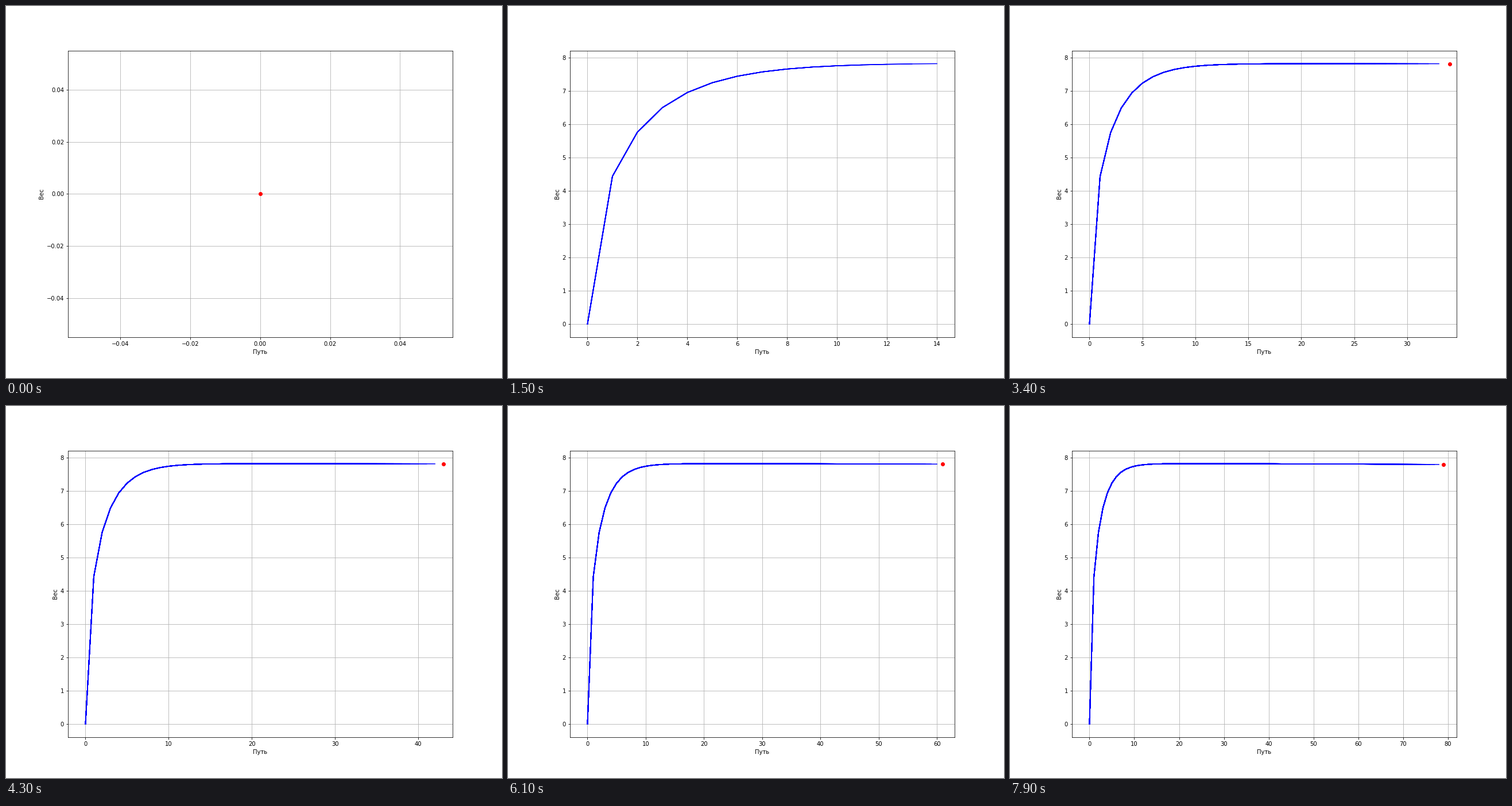
Animation, 864 px wide and 648 px high, one loop 8 s. Source, as a matplotlib script:

```python
import matplotlib.pyplot as plt
import numpy as np
from matplotlib.animation import FuncAnimation

FRAMES = 80
INTERVAL = 100

# Fast saturation followed by a very slow sag.
path = np.arange(FRAMES)
weight = 7.83 - 4.31 * 0.671**path - 1.94 * 0.26**path - 4.5e-6 * path**2
weight[0] = 0

fig, ax = plt.subplots(figsize=(12, 9), dpi=72)
ax.set_xlabel("Путь")
ax.set_ylabel("Вес")
ax.grid(True)

dot, = ax.plot([0], [0], "ro")
# Overlapping traces: the older a segment, the more often it is stroked.
traces = [ax.plot(path[:k], weight[:k], "b-")[0] for k in range(FRAMES)]


def limits(top):
    """Range from 0 to top with a 5 % margin; a single point gets a small box."""
    if top == 0:
        return -0.055, 0.055
    return -0.05 * top, 1.05 * top


def update(i):
    for k, trace in enumerate(traces):
        trace.set_visible(k <= i)
    dot.set_data([path[i]], [weight[i]])
    shown = max(i, 1)
    ax.set_xlim(*limits(path[shown - 1]))
    ax.set_ylim(*limits(weight[:shown].max()))
    return [dot, *traces]


anim = FuncAnimation(fig, update, frames=FRAMES, init_func=lambda: update(0),
                     interval=INTERVAL, repeat=True, repeat_delay=0, blit=False)
plt.show()
```
